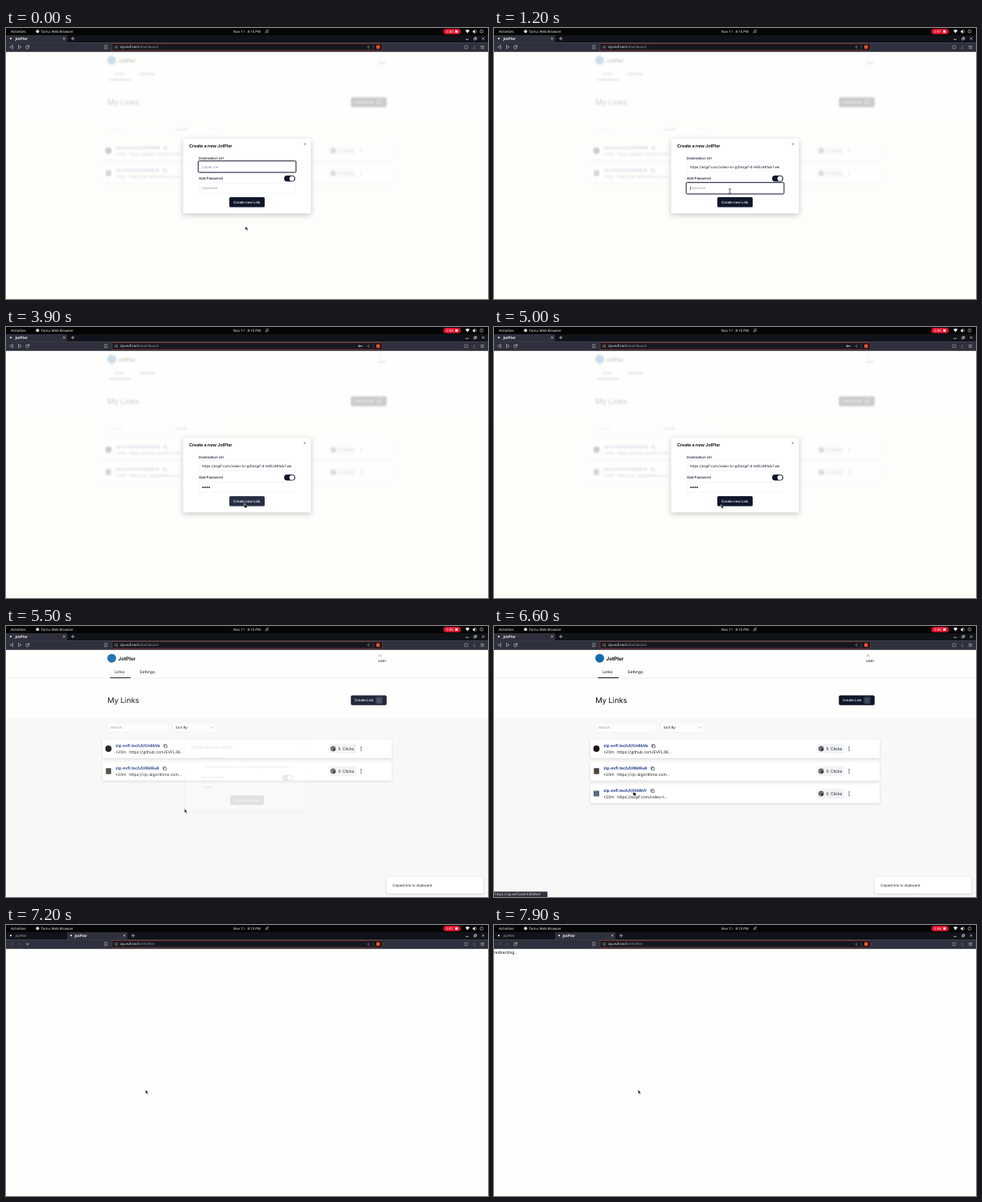
Recreate the animation shown at these times as an HTML page. Size 600 by 338 pixels, loop 8 s.

```html
<!DOCTYPE html>
<html lang="en">
<head>
<meta charset="utf-8">
<title>JotPler</title>
<style>
  html, body { margin: 0; width: 100%; height: 100%; overflow: hidden; background: #fff; }
  svg { display: block; width: 600px; height: 338px; }
  text { font-family: Inter, sans-serif; text-rendering: geometricPrecision; white-space: pre; }
  .ui { font-family: "Noto Sans", sans-serif; }
  .line { fill: none; stroke-linecap: round; stroke-linejoin: round; }
  .card { filter: drop-shadow(0 1px 1.5px #0002); }
  .raised { filter: drop-shadow(0 2px 3px #0003); }
</style>
</head>
<body>
<svg id="stage" viewBox="0 0 600 338"></svg>
<script>
const LOOP = 8000, FRAME = 100;
const INK = '#0f172a', PANEL = '#2e313d', GREY = '#8b93a1';
const BRAND = 'JotPler', HOST = 'zip.evfl.tech';
const TARGET = 'https://ezgif.com/video-to-gif/ezgif-4-b65c891ab7.we';

const rect = (x, y, w, h, fill, extra = '') =>
  `<rect x="${x}" y="${y}" width="${w}" height="${h}" fill="${fill}" ${extra}/>`;
const dot = (x, y, r, fill, extra = '') => `<circle cx="${x}" cy="${y}" r="${r}" fill="${fill}" ${extra}/>`;
const path = (d, stroke, width = .5) => `<path class="line" d="${d}" stroke="${stroke}" stroke-width="${width}"/>`;
const group = (attrs, ...parts) => `<g ${attrs}>${parts.join('')}</g>`;
// y is the vertical middle of the line
const text = (x, y, s, size = 4.375, fill = INK, extra = '') =>
  `<text x="${x}" y="${y + size * .36}" font-size="${size}" fill="${fill}" ${extra}>${s}</text>`;
const ui = (x, y, s, fill = '#e8e8ea', size = 4.4, extra = '') => text(x, y, s, size, fill, 'class="ui" ' + extra);
const cross = (x, y, r, color) => path(`M${x - r} ${y - r}l${2 * r} ${2 * r}m0 ${-2 * r}l${-2 * r} ${2 * r}`, color, .6);
const progress = (t, start, length) => Math.min(1, Math.max(0, (t - start) / length));

function topBar(t) {
  const seconds = Math.floor((t + 100) / 1000);
  return rect(0, 0, 600, 9, '#050505') +
    ui(6, 4.2, 'Activities', '#eee', 4.5, 'font-weight="500"') +
    dot(39.3, 4.2, 2, '#d8d8d8') +
    ui(43.5, 4.2, 'Tarnu Web Browser', '#eee', 4.4, 'font-weight="500"') +
    ui(283, 4.2, 'Nov 11', '#eee') + ui(300.5, 4.2, '8:15 PM', '#eee') +
    path('M323.3 5.3h3.4l-.6-.8v-1.2a1.1 1.1 0 0 0-2.2 0v1.2zM323 6.2l4-4', '#bbb') +
    rect(544.5, 1, 21.5, 6.8, '#e0122f', 'rx="3.4"') +
    ui(548, 4.4, `0:0${seconds}`, '#fff') + rect(559.3, 2.9, 3, 3, '#fff') +
    `<path d="M571.8 3q2.7-2 5.4 0l-2.7 3.6z" fill="#eee"/>` +
    `<path d="M581 3.4h1.2l1.6-1.5v5l-1.6-1.5H581z" fill="#eee"/>` +
    path('M585 2.6q1.3 1.7 0 3.4', '#eee') +
    dot(592, 4.3, 1.9, 'none', 'stroke="#ddd" stroke-width=".6"');
}

function tab(x, right, title, active, icon = true) {
  const color = active ? '#f0f0f2' : '#9a9ca6';
  return (active ? rect(x, 9, right - x, 9.5, PANEL) : '') +
    (icon ? dot(x + 6 - (x ? 1 : 0), 13.2, 1.1, '#e4e4e4') : '') +
    ui(x ? x + (icon ? 9.5 : 11) : 11.5, 13.2, title, color, 4.6, active ? 'font-weight="600"' : '') +
    (active ? cross(right - 3.7, 13.2, 1, '#eee') : '');
}

function browser(t) {
  const second = t >= 6700, committed = t >= 7100;
  const right = second ? 133 + 18 * progress(t, 6700, 100) : 76;
  const nav = second ? '#484b56' : '#c6c8d0';
  let address;
  if (!second) address = [HOST, '/dashboard', 24.3];
  else if (committed) address = [HOST, '/l/0htRnY', 24.3];
  else address = ['blank', 'about:'];
  const [strong, weak] = address;
  const label = second && !committed
    ? `<tspan fill="#9496a0">${weak}</tspan>${strong}`
    : `${strong}<tspan fill="#9496a0">${weak}</tspan>`;
  return rect(0, 9, 600, 9.5, '#11131a') + rect(0, 18.2, 600, 11.6, PANEL) +
    tab(0, 76, BRAND, !second) +
    (second ? tab(76, right, committed ? BRAND : 'Loading...', true, committed) : '') +
    path(`M${right + 5.4} 13.2h3.6m-1.8-1.8v3.6`, '#eee', .6) +
    path('M572.5 14.3h3', '#eee', .7) + path('M582.7 12.7h2.2v2.2h-2.2zM583.5 12v-.3h2.3v2.3h-.4', '#eee', .6) +
    cross(594, 13.2, 1.2, '#eee') +
    path('M8.5 21.8v4l-3.4-2z', nav, .6) + path('M15.5 21.8v4l3.4-2z', nav, .6) +
    (second && t < 7400 ? cross(26.8, 23.8, 1.1, '#ddd')
      : path('M28.5 22.9a2 2 0 1 0 .2 1.5M28.7 21.5v1.6h-1.6', '#ddd', .6)) +
    path('M123.2 21.6h2.6v4.4l-1.3-1.1-1.3 1.1z', '#ccc') +
    rect(132, 19.5, 336.5, 8.5, '#16181f', 'rx="1" stroke="#8e3532" stroke-width=".8"') +
    (second && !committed
      ? dot(137, 23.8, 1.8, 'none', 'stroke="#ccc" stroke-width=".5"') + path('M135.2 23.8h3.6M137 22v3.6', '#ccc', .4)
      : path('M135.4 22.8h1.6m1 0h1M135.4 24.8h.8m1 0h1.8', '#ccc', .6)) +
    ui(142, 23.7, label, '#f0f0f2', 4.35) +
    (t >= 2200 && t < 5300 ? dot(439.7, 23.7, 1, 'none', 'stroke="#ddd" stroke-width=".7"') + path('M440.8 23.7h2.4v.9', '#ddd', .7) : '') +
    path('M452.4 22.4l-2.5 1.4 2.5 1.4', '#bbb') + path('M457.2 21.6v4.4', '#888', .4) +
    rect(461, 21.6, 4.3, 4.3, '#f4512c', 'rx=".8"') +
    path('M571.3 22h3.4v3.6h-3.4z', '#bbb') + path('M583 21.8v2.6m-1-1l1 1 1-1M581.4 25.7h3.2', '#747783') +
    path('M591.2 22.3h3.6m-3.6 1.5h3.6m-3.6 1.5h3.6', '#ddd');
}

const copyIcon = (x, y) =>
  path(`M${x - .8} ${y - .8}h2.9v2.9h-2.9zM${x - 1.4} ${y + 1}h-.5v-2.9h2.9v.5`, INK, .5);

function linkRow(index, id, url, clicks, icon, copyX) {
  const y = index * 28;
  return group(`transform="translate(0 ${y})"`,
    rect(120, 141.5, 360, 23.3, '#fff', 'class="card" rx="1"'), icon,
    text(136.3, 149.3, `${HOST}/l/${id}`, 5, '#1e3a8a', 'font-weight="700"'),
    copyIcon(copyX, 149.6),
    text(136.3, 157, '•20m', 5, '#222'), text(153.2, 157, url, 5, '#222'),
    rect(401.5, 147, 34.5, 12, '#f1f3f4', 'rx="2"'),
    dot(407.2, 153, 3, '#8b8e92', 'stroke="#333" stroke-width=".7"'),
    path('M405 153h4M407.2 150.5v2.5', '#333', .5),
    `<path d="M407 152.8l3.6 1.3-1.5.7-.7 1.6z" fill="#111"/>`,
    text(413.4, 153.1, clicks, 5), text(419, 153.1, 'Clicks', 5),
    [150.9, 153.1, 155.3].map(cy => dot(442, cy, .65, '#111')).join(''));
}

function dashboard(t) {
  return rect(120, 30, 360, 35, '#fefefd') +
    dot(131.6, 40.2, 5.5, '#1769aa') +
    text(139.5, 40.3, BRAND, 6.25, '#0a0a0a', 'font-weight="700"') +
    path('M464.5 38.3v-2.2h2m.5.8v1.4', '#777') +
    text(463, 43, 'user', 5, '#222') +
    text(135.3, 57.2, 'Links', 5, '#111') + text(166.3, 57.4, 'Settings', 5, '#111') +
    rect(0, 64.7, 600, .5, '#dcdcda') + rect(129.5, 64.1, 25.5, 1, '#111') +
    text(126.2, 92.6, 'My Links', 9.375, '#0a0a0a') +
    rect(429.3, 86.4, 44.5, 12.4, INK, 'rx="1.8"') +
    text(434, 92.6, 'Create Link', 4.375, '#f8fafc', 'font-weight="500"') +
    rect(460.3, 88.3, 8.6, 8.6, '#333c4c', 'rx="1.3"') +
    path('M465.8 91.3a1.7 1.7 0 1 0 0 2.6', '#8c95a3') +
    rect(126.3, 120.6, 75.5, 12, '#fdfdfc', 'rx="1.5" stroke="#e5e7eb" stroke-width=".4"') +
    text(130, 126.7, 'Search', 4.375, GREY) +
    rect(207.3, 120.6, 55.5, 12, '#fdfdfc', 'rx="1.5" stroke="#e5e7eb" stroke-width=".4"') +
    text(211, 126.5, 'Sort By') + path('M255.4 125.8l1.5 1.5 1.5-1.5', '#888') +
    linkRow(0, 'On6bVa', 'https://github.com/EVFL38...', 5, dot(127.5, 153, 3.9, '#161616'), 198.4) +
    linkRow(1, 'iNd6uA', 'https://cp-algorithms.com...', 0, rect(124.3, 149.3, 6.6, 7.4, '#4a4540', 'rx="1"'), 197.5) +
    (t >= 5900 ? linkRow(2, '0htRnY', 'https://ezgif.com/video-t...', 0, rect(124, 149.5, 7, 7, '#5d6880'), 197.3) : '');
}

function field(y, focused, value, filled) {
  return rect(240.1, y, 120, 12.5, '#fff', 'rx="1.5" stroke="#e2e8f0" stroke-width=".4"') +
    (focused ? rect(239.2, y - .9, 121.8, 14.3, 'none', `rx="1.2" stroke="${INK}" stroke-width="1"`) : '') +
    (filled === 'dots' ? value : text(244, y + 6.3, value, 4.375, filled ? INK : GREY));
}

function dialog(t) {
  const typed = t < 2200 ? 0 : Math.min(4, Math.floor((t - 2100) / 100));
  const onPassword = t >= 1200 && t < 3500;
  const bullets = Array.from({ length: typed }, (_, i) => dot(245.2 + i * 2.55, 200, .95, INK)).join('');
  const caretX = typed ? 244.4 + typed * 2.55 : 244;
  const caretOn = onPassword && (t < 1900 || (t >= 2200 && t < 2900));
  const hover = (t >= 200 && t < 1000) || (t >= 3200 && t < 5000);
  return rect(220.3, 137.8, 159.4, 93.4, '#fff', 'class="raised" rx="1.5" stroke="#e5e7eb" stroke-width=".4"') +
    text(228, 147.4, `Create a new ${BRAND}`, 5.625, '#0a0a0a', 'font-weight="600" letter-spacing="-.14"') +
    cross(372, 144.6, 1.1, '#555') +
    text(240, 162.4, 'Destination Url', 4.375, INK, 'font-weight="500"') +
    field(166.7, t < 1200, t >= 500 ? TARGET : 'jotpler.me', t >= 500) +
    text(240, 187.6, 'Add Password', 4.375, INK, 'font-weight="500"') +
    rect(346.2, 184, 13.8, 7.5, INK, 'rx="3.75"') + dot(355.9, 187.75, 3.1, '#fff') +
    field(193.6, onPassword, typed ? bullets : 'mysecret', typed ? 'dots' : false) +
    (caretOn ? rect(caretX, 197.4, .45, 5.2, '#111') : '') +
    rect(278, 210.9, 44, 12.5, hover ? '#273043' : INK, 'rx="1.5"') +
    text(283, 217.1, 'Create new Link', 4.375, '#f8fafc', 'font-weight="500"');
}

function page(t) {
  if (t >= 7200) return rect(0, 29.8, 600, 309, '#fdfdfb') + (t >= 7400 ? text(0, 34, 'redirecting...', 5, '#111') : '');
  if (t >= 6700) return rect(0, 29.8, 600, 309, PANEL);
  const leaving = progress(t, 5320, 200), shown = 1 - leaving, toast = progress(t, 5250, 150);
  const scale = 1 - .05 * leaving;
  return rect(0, 29.8, 600, 309, '#fefefd') + rect(0, 115, 600, 223, '#f8f9f7') +
    group(shown > 0 ? `style="filter:blur(${1.25 * shown}px)"` : '', dashboard(t)) +
    (shown > 0 ? rect(0, 29.8, 600, 309, '#fefefc', `opacity="${.78 * shown}"`) +
      group(`opacity="${shown}" transform="translate(300 ${184.5 + 1.7 * leaving}) scale(${scale}) translate(-300 -184.5)"`, dialog(t)) : '') +
    (toast > 0 ? group(`opacity="${toast}" transform="translate(0 ${3 * (1 - toast)})"`,
      rect(474, 312.8, 120.6, 20.8, '#fff', 'class="card" rx="1.5" stroke="#e5e7eb" stroke-width=".4"'),
      text(481.3, 323.3, 'Copied link to clipboard')) : '') +
    (t >= 6500 ? rect(0, 331.3, 66.5, 7, PANEL) + ui(1.2, 334.7, `https://${HOST}/l/0htRnY`, '#e8e8ea', 4.25) : '');
}

// time, x, y of the pointer's hot spot
const TRACK = [
  [0, 298, 247.3], [200, 297, 212.5], [900, 297, 212.5], [1300, 293, 202],
  [1400, 293, 202], [1500, 291, 203], [2800, 291, 203], [3300, 297, 219.3], [3600, 297, 219.3],
  [3700, 295.5, 219.3], [3900, 297, 219.5], [4000, 297, 219.5], [4200, 297.5, 219.7], [4800, 297.5, 219.7],
  [5500, 222.2, 228], [5700, 221, 227], [6500, 173.7, 205.5], [7700, 173.7, 205.5], [7900, 179.4, 205.5]
];

function pointer(t) {
  const next = TRACK.findIndex(k => k[0] > t);
  const [t1, x1, y1] = next < 0 ? TRACK[TRACK.length - 1] : TRACK[next];
  const [t0, x0, y0] = next < 0 ? TRACK[TRACK.length - 1] : TRACK[next - 1];
  const f = t1 > t0 ? (t - t0) / (t1 - t0) : 0, s = f * f * (3 - 2 * f);
  const at = `transform="translate(${x0 + (x1 - x0) * s} ${y0 + (y1 - y0) * s})"`;
  if (t >= 1200 && t < 3000)
    return group(at, path('M-1.3-2.9q1.3 0 1.3.7v4.4q0 .7 1.3.7M1.3-2.9q-1.3 0-1.3.7M0 2.2q0 .7-1.3.7', '#222', .7));
  const hand = (t >= 200 && t < 1000) || (t >= 3200 && t < 5000) || (t >= 6500 && t < 6700);
  const shape = hand
    ? 'M-.5.5q.6-.8 1.1 0v2l2.2.5q.6.3.5 1l-.5 1.9H.4L-1.4 3.6q.2-.7.9-.2z'
    : 'M0 0v5l1.2-1.1.9 2 .9-.4-.9-1.9h1.5z';
  return group(at, `<path d="${shape}" fill="#111" stroke="#fff" stroke-width=".45"/>`);
}

const stage = document.getElementById('stage');
let drawn = -1;
function tick() {
  const t = Math.floor(performance.now() % LOOP / FRAME) * FRAME;
  if (t !== drawn) {
    stage.innerHTML = page(t) + browser(t) + topBar(t) + pointer(t);
    drawn = t;
  }
  requestAnimationFrame(tick);
}
tick();
</script>
</body>
</html>
```
